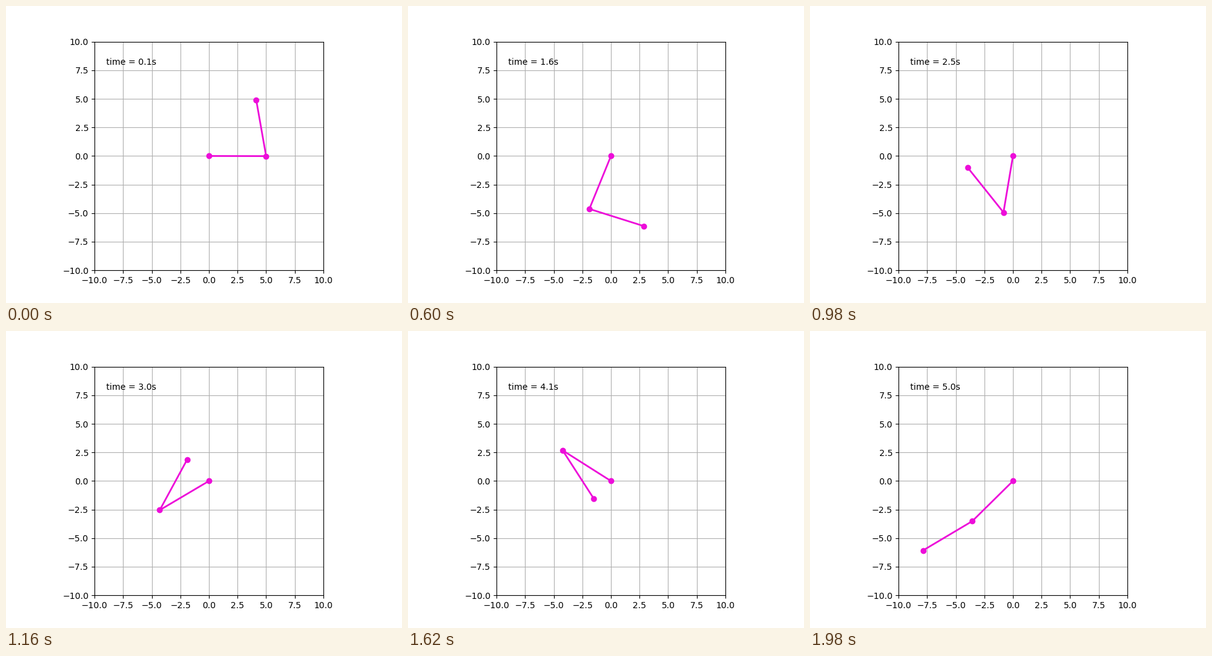
Animation of 640x480 px, one loop 2000 ms. Source, as a matplotlib script:

```python
import matplotlib.pyplot as plt
import numpy as np
from matplotlib.animation import FuncAnimation

G = 9.8          # gravity, m/s^2
L1 = L2 = 5.0    # rod lengths, m
M1 = M2 = 1.0    # bob masses, kg
DT = 0.05        # simulated seconds per frame
FRAMES = 100
SUBSTEPS = 50


def derivs(state):
    """Time derivative of (theta1, omega1, theta2, omega2)."""
    th1, w1, th2, w2 = state
    s, c = np.sin(th2 - th1), np.cos(th2 - th1)
    mass = M1 + M2
    den = mass - M2 * c * c
    a1 = (M2 * L1 * w1**2 * s * c + M2 * G * np.sin(th2) * c
          + M2 * L2 * w2**2 * s - mass * G * np.sin(th1)) / (den * L1)
    a2 = (-M2 * L2 * w2**2 * s * c + mass * G * np.sin(th1) * c
          - mass * L1 * w1**2 * s - mass * G * np.sin(th2)) / (den * L2)
    return np.array([w1, a1, w2, a2])


def rk4(state, h):
    k1 = derivs(state)
    k2 = derivs(state + h / 2 * k1)
    k3 = derivs(state + h / 2 * k2)
    k4 = derivs(state + h * k3)
    return state + h / 6 * (k1 + 2 * k2 + 2 * k3 + k4)


def simulate():
    state = np.radians([90.0, 0.0, -170.0, 0.0])
    path = [state]
    for _ in range(FRAMES):
        for _ in range(SUBSTEPS):
            state = rk4(state, DT / SUBSTEPS)
        path.append(state)
    return np.array(path)


th1, _, th2, _ = simulate().T
x1, y1 = L1 * np.sin(th1), -L1 * np.cos(th1)
x2, y2 = x1 + L2 * np.sin(th2), y1 - L2 * np.cos(th2)

fig = plt.figure(figsize=(6.4, 4.8), dpi=100)
ax = fig.add_subplot(autoscale_on=False, xlim=(-10, 10), ylim=(-10, 10))
ax.set_aspect("equal")
ax.grid()

rods, = ax.plot([], [], "o-", lw=2, color="xkcd:fuchsia")
clock = ax.text(0.05, 0.9, "", transform=ax.transAxes)


def update(frame):
    i = frame + 1
    rods.set_data([0, x1[i], x2[i]], [0, y1[i], y2[i]])
    clock.set_text("time = %.1fs" % (i * DT))
    return rods, clock


anim = FuncAnimation(fig, update, frames=FRAMES, interval=20,
                     repeat=True, repeat_delay=0)
plt.show()
```
